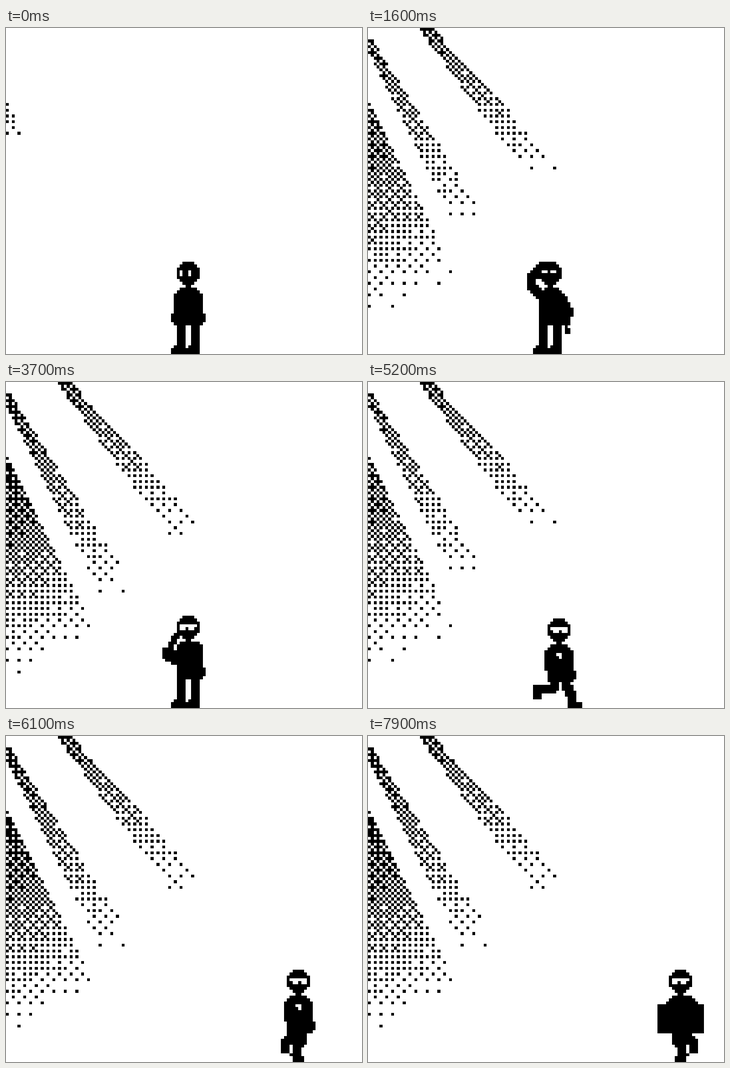
Recreate the animation shown at these times as an HTML page with a canvas. Size 781 px wide and 717 px high, loop 8 s.

```html
<!DOCTYPE html>
<html lang="en">
<head>
<meta charset="utf-8">
<title>Light beams</title>
<style>
  html, body { margin: 0; width: 100%; height: 100%; overflow: hidden; background: #fff; }
  canvas { display: block; width: 781px; height: 717px; image-rendering: pixelated; }
</style>
</head>
<body>
<canvas id="stage" width="123" height="113"></canvas>
<script>
const W = 123, H = 113, STEP = 100, LOOP = 8000;
const ctx = document.getElementById('stage').getContext('2d');

const ink = color => { ctx.fillStyle = color; };
const box = (x, y, w, h) => ctx.fillRect(x, y, w, h);

function disc(cx, cy, r) {
  for (let y = cy - r; y < cy + r; y++) {
    const half = Math.round(Math.sqrt(r * r - (y + 0.5 - cy) ** 2));
    box(cx - half, y, 2 * half, 1);
  }
}

// Box with bevelled upper corners
function slab(x, y, w, h, bevel) {
  for (let i = 0; i < h; i++) {
    const inset = Math.max(0, bevel - i);
    box(x + inset, y + i, w - 2 * inset, 1);
  }
}

// Square brush dragged along a few joints
function limb(size, ...joints) {
  for (let i = 1; i < joints.length; i++) {
    const [x0, y0] = joints[i - 1], [x1, y1] = joints[i];
    const n = Math.max(Math.abs(x1 - x0), Math.abs(y1 - y0));
    for (let k = 0; k <= n; k++) {
      box(Math.round(x0 + (x1 - x0) * k / n), Math.round(y0 + (y1 - y0) * k / n), size, size);
    }
  }
}

// Body parts sit in a frame whose origin is the head's top left corner.
function head() {
  disc(4, 4, 4);
  box(3, 8, 2, 1);
}

function eyes(w, h) {
  ink('#fff');
  for (const x of [1, 4]) box(x, 3, w, h);
}

function goggles(right) {
  ink('#fff');
  box(1, 3, 6, 2);
  ink('#000');
  for (const x of [3, 6]) box(right ? 7 - x : x, 4, 1, 1);
}

function pocket() {
  ink('#fff');
  box(3, 12, 2, 1);
  box(4, 13, 1, 1);
}

function trunk() {
  slab(-1, 9, 10, 9, 2);
  box(0, 18, 10, 3);
  box(0, 21, 9, 1);
}

function hangingArm() {
  box(-2, 18, 3, 3);
  box(-1, 21, 1, 1);
}

function shading() {
  slab(0, 9, 9, 13, 2);
  limb(3, [0, 0], [-4, 4], [-4, 7], [-1, 10]);
  limb(3, [6, 11], [9, 16], [7, 18]);
  box(9, 20, 2, 5);
  ink('#fff');
  box(10, 22, 1, 1);
}

function raising() {
  slab(0, 9, 9, 13, 1);
  box(9, 18, 1, 3);
  limb(4, [-1, 13], [-5, 11]);
  limb(2, [-4, 11], [-1, 6]);
}

function crate() {
  slab(-2, 9, 13, 3, 3);
  box(-4, 12, 16, 10);
}

function standing() {
  for (const x of [0, 5]) {
    box(x, 22, 3, 8);
    box(x - 1, 29, 4, 1);
  }
  box(-2, 30, 10, 2);
}

function stride() {
  limb(3, [1, 21], [0, 23], [-5, 23], [-5, 25]);
  limb(3, [5, 21], [7, 26], [7, 28]);
  box(7, 29, 5, 2);
}

function passing() {
  box(0, 22, 7, 4);
  limb(3, [1, 21], [-2, 24], [-2, 26]);
  limb(3, [4, 21], [2, 25], [2, 27]);
  box(1, 29, 4, 1);
  box(2, 30, 4, 2);
}

function at(x, y, parts, flip = false) {
  ctx.setTransform(flip ? -1 : 1, 0, 0, 1, flip ? x + 8 : x, y);
  for (const part of parts) {
    ink('#000');
    part();
  }
  ctx.setTransform(1, 0, 0, 1, 0, 0);
}

// Ordered 8 x 8 threshold
function bayer(x, y) {
  let v = 0;
  for (let b = 0; b < 3; b++) v = v * 4 + [[0, 2], [3, 1]][y >> b & 1][x >> b & 1];
  return (v + 0.4) / 64;
}

// Edges run as x = a + b * y; reach goes from first to dim, then jumps to bright.
const beams = [
  { left: [0, 0], right: [-12.9, 0.5], first: 39.6, dim: [101.3, 1], bright: [104.1, 1.15] },
  { left: [-4, 0.5], right: [-1.45, 0.638], first: 4, dim: [87.45, 0.7], bright: [94, 0.8] },
  { left: [17.2, 0.735], right: [22.3, 0.92], first: 9, dim: [83.4, 0.74], bright: [88.5, 0.75] }
];
const flicker = '1101100001110000011';

function light(n) {
  const isBright = n > 9 && flicker[n % flicker.length] === '1';
  const grow = Math.min(1, n / 9);
  ink('#000');
  for (const { left, right, first, dim, bright } of beams) {
    const [reach, gain] = isBright ? bright : dim;
    const far = first + (reach - first) * grow;
    for (let y = 0; y < far && y < H; y++) {
      const end = right[0] + right[1] * y;
      for (let x = Math.max(0, Math.ceil(left[0] + left[1] * y)); x <= end; x++) {
        if (gain * (1 - (y + 0.52 * x) / far) >= bayer(x, y)) box(x, y, 1, 1);
      }
    }
  }
}

function stand(n) {
  const look = n >= 35 ? () => goggles(n >= 49)
    : n >= 11 && n < 18 ? () => eyes(2, 1)
    : () => eyes(1, 2);
  const body = n >= 11 && n < 18 ? [shading]
    : n >= 33 && n < 46 ? [raising]
    : n >= 24 ? [trunk, pocket]
    : [trunk, hangingArm];
  at(59, 81, [head, ...body, standing, look]);
}

function walk(x, wide, parts, right) {
  at(x, wide ? 82 : 81, [...parts, wide ? stride : passing], !right);
  at(x, wide ? 82 : 81, [head, () => goggles(right)]);
}

function leave(j) {
  const x = 62 + 15 * (j >> 2) + [0, 5, 8, 10][j & 3];
  walk(x, j % 2 === 0, [trunk, pocket, () => {}], true);
}

function comeBack(left) {
  const x = 104 + Math.floor(3.75 * left), wide = left % 2 === 1;
  walk(x, wide, [], false);
  at(x, wide ? 82 : 81, [crate]);
}

function draw(time) {
  const n = Math.floor(time % LOOP / STEP);
  ink('#fff');
  box(0, 0, W, H);
  light(n);
  if (n < 52) stand(n);
  else if (n < 72) leave(n - 52);
  else if (n > 72) comeBack(79 - n);
}

const start = performance.now();
function tick() {
  draw(performance.now() - start);
  requestAnimationFrame(tick);
}
tick();
</script>
</body>
</html>
```
